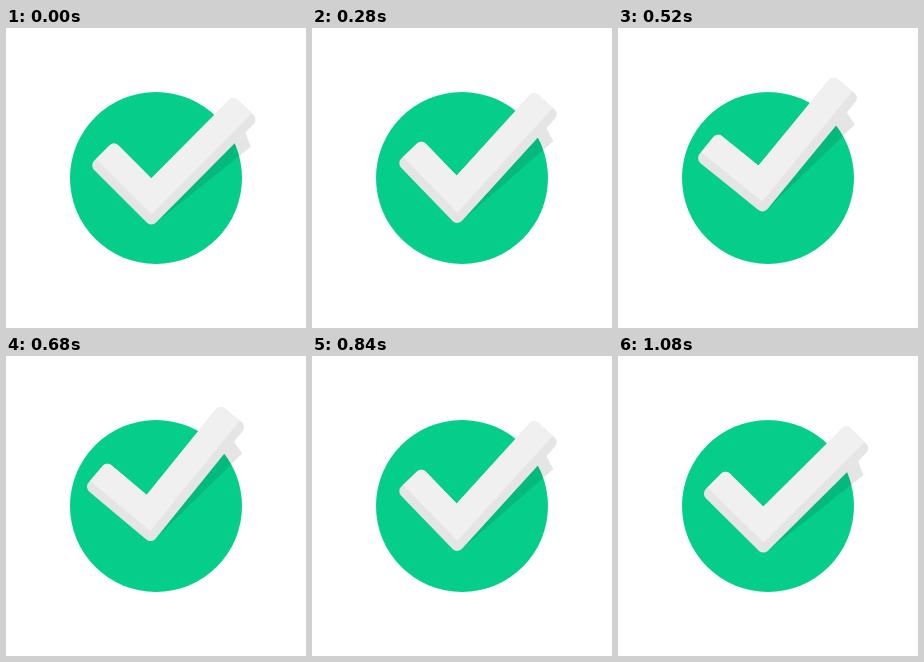
Write an HTML page with a canvas that moves like this. It is 300 by 300 pixels and loops after 1.28 s.

```html
<!DOCTYPE html>
<html lang="en">
<head>
<meta charset="utf-8">
<title>Check mark</title>
<style>
  html, body { margin: 0; width: 100%; height: 100%; overflow: hidden; background: #fff; }
  canvas { display: block; width: 300px; height: 300px; }
</style>
</head>
<body>
<canvas id="stage" width="300" height="300"></canvas>
<script>
const ctx = document.getElementById('stage').getContext('2d');
const STEP = 40, LOOP = 1280, LAST = 14;
const LEFT = 87.5, RIGHT = 151.5, WIDTH = 34.6, BEVEL = 9, ROUND = 6.5;

// step, left arm angle, right arm angle, height of the lower vertex
const KEYS = [
  [0, 45, 45.2, 199.2],
  [1, 44.7, 44.8, 199.2],
  [5, 43, 43.5, 199],
  [7, 46, 47.7, 198],
  [9, 45, 50.7, 192.8],
  [11, 40, 51, 187.8],
  [13, 39, 50.6, 186.1],
  [14, 38.8, 50.5, 185.8]
];

const rad = deg => deg * Math.PI / 180;
const move = (p, d, len) => [p[0] + d[0] * len, p[1] + d[1] * len];

function slope(i, c) {
  const a = KEYS[Math.max(0, i - 1)];
  const b = KEYS[Math.min(KEYS.length - 1, i + 1)];
  return (b[c] - a[c]) / (b[0] - a[0]);
}

function sample(s, c) {
  let i = 0;
  while (i < KEYS.length - 2 && s >= KEYS[i + 1][0]) i++;
  const a = KEYS[i], b = KEYS[i + 1];
  const h = b[0] - a[0], u = (s - a[0]) / h, v = 1 - u;
  return a[c] * (1 + 2 * u) * v * v + b[c] * u * u * (3 - 2 * u)
    + h * u * v * (v * slope(i, c) - u * slope(i + 1, c));
}

function trace(points, radii) {
  const n = points.length;
  const last = points[n - 1], first = points[0];
  ctx.beginPath();
  ctx.moveTo((last[0] + first[0]) / 2, (last[1] + first[1]) / 2);
  points.forEach((p, i) => {
    const q = points[(i + 1) % n];
    ctx.arcTo(p[0], p[1], q[0], q[1], radii ? radii[i] : 0);
  });
  ctx.closePath();
}

function draw(s) {
  const aL = rad(sample(s, 1)), deg = sample(s, 2), aR = rad(deg);
  const base = [145.4, sample(s, 3)];
  const dL = [-Math.cos(aL), -Math.sin(aL)], nL = [-dL[1], dL[0]];
  const dR = [Math.cos(aR), -Math.sin(aR)], nR = [dR[1], -dR[0]];

  // point on the fold line at a given distance from both lower edges
  const fold = w => {
    const k = w / Math.sin(aL + aR);
    return move(move(base, dL, k), dR, k);
  };
  const endL = move(base, dL, LEFT), endR = move(base, dR, RIGHT);
  const check = low => [
    move(endL, nL, low), move(endL, nL, WIDTH), fold(WIDTH),
    move(endR, nR, WIDTH), move(endR, nR, low), fold(low)
  ];

  ctx.fillStyle = '#fff';
  ctx.fillRect(0, 0, 300, 300);
  ctx.fillStyle = '#05ce8b';
  ctx.beginPath();
  ctx.arc(150, 150, 86, 0, Math.PI * 2);
  ctx.fill();

  const aS = aR - rad(6.2), tilt = rad(21 + (deg - 45) * 2.3);
  const tip = move(base, [Math.cos(aS), -Math.sin(aS)], 128);
  const back = move(tip, [-Math.sin(tilt), -Math.cos(tilt)], 21);
  ctx.fillStyle = 'rgba(0,0,0,.1)';
  trace([move(base, dR, 7), tip, back]);
  ctx.fill();

  ctx.save();
  trace(check(0), [ROUND, ROUND, 0, ROUND, ROUND, ROUND]);
  ctx.fillStyle = '#e5e5e5';
  ctx.fill();
  ctx.clip();
  ctx.fillStyle = '#f0f0f0';
  trace(check(BEVEL));
  ctx.fill();
  ctx.restore();
}

function tick() {
  const n = Math.floor(performance.now() % LOOP / STEP);
  draw(n <= LAST ? n : Math.max(1, 2 * LAST - n));
  requestAnimationFrame(tick);
}
tick();
</script>
</body>
</html>
```
